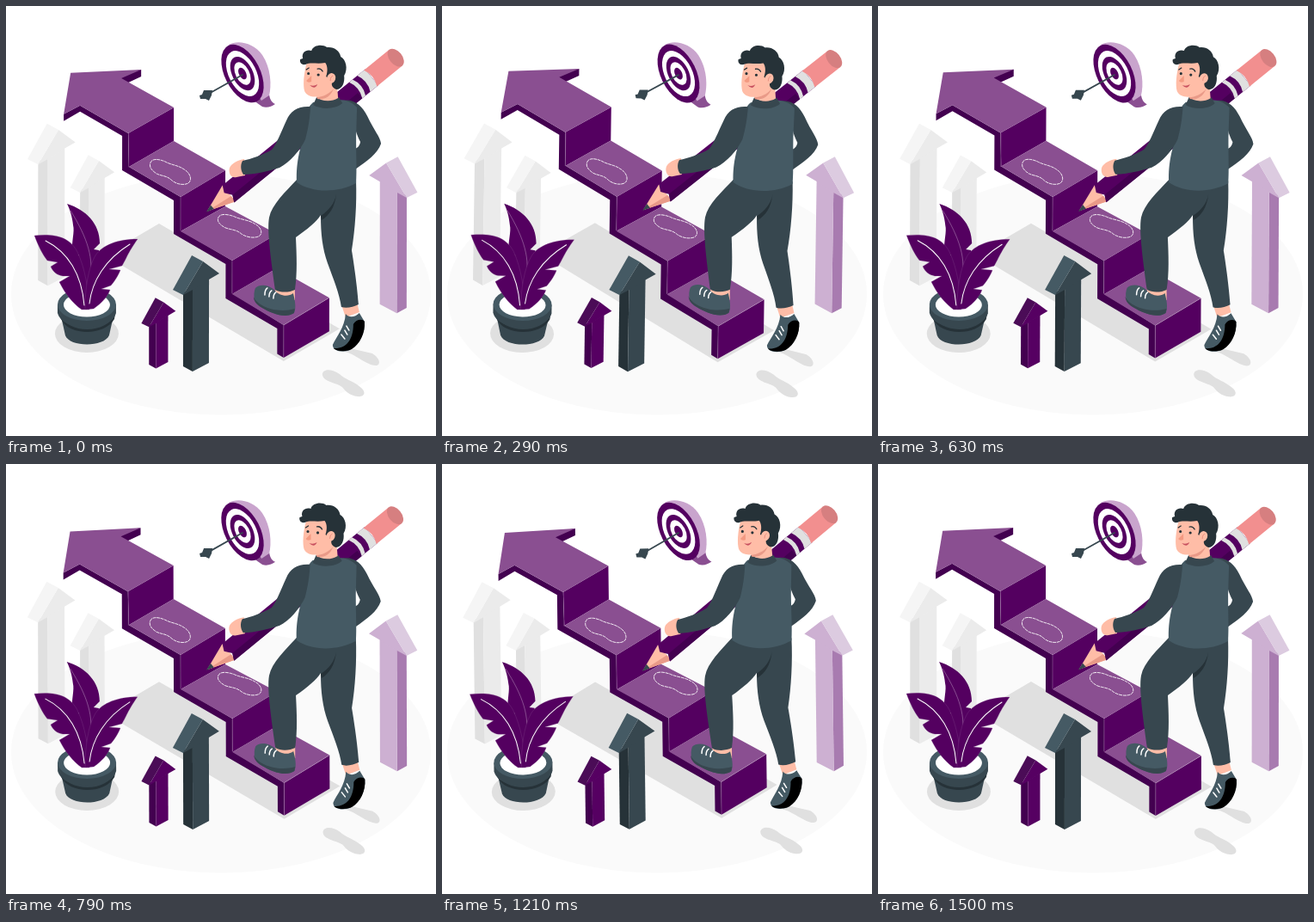
These frames come from a looping animation (500 px wide and 500 px high, 1540 ms). An HTML page:

```html
<!DOCTYPE html>
<html lang="en">
<head>
<meta charset="utf-8">
<title>Drawing the steps up</title>
<style>
  html, body { margin: 0; width: 100%; height: 100%; overflow: hidden; background: #fff; }
  svg { display: block; width: 100vw; height: 100vh; }
  .sway { transform-box: fill-box; transform-origin: center; transform: rotate(var(--angle, 0deg)); }
  .line { fill: none; stroke: #fff; stroke-linecap: round; stroke-linejoin: round; }
  .purple { fill: #540060; } .deep { fill: #430050; } .mauve { fill: #8a4f91; }
  .slate { fill: #37474f; } .steel { fill: #455a64; } .ink { fill: #263238; }
  .skin { fill: #ffbda7; } .shade { fill: #e0e0e0; }
</style>
</head>
<body>
<svg id="stage" viewBox="0 0 500 500">
  <ellipse cx="250" cy="335" rx="244" ry="140.5" fill="#fafafa"/>

  <g id="pale" class="sway"></g>

  <g id="stairs" class="sway">
    <path class="shade" d="M178 253 388 375 323 413 115 290Z"/>
    <path class="deep" d="M157 74V82L140 90 120 80ZM67 126 86 116 142 148 143 187 203 222V261L263 296V334L323 371V409L315.500 404.500V375L255.500 340V300L195 265V226L135 191V151L86 123 67 134Z"/>
    <path class="purple" d="M142 148 195 118V157L143 187ZM203 222 255 191V233L203 262ZM263 296 315 265V305L263 335ZM323 371 376 339V378L323 409Z"/>
    <path class="mauve" d="M75 78 157 74 134 84 195 118 142 148 86 116 67 126ZM143 187 195 157 255 191 203 222ZM203 262 255 233 315 265 263 296ZM263 335 315 305 376 339 323 371Z"/>
    <path class="line" stroke-width=".5" opacity=".45" d="M142.500 148V187M203 222V261M263 296V334M323 409V371L376 339"/>
    <g class="line" stroke-width=".9" stroke-dasharray="3 1.500">
      <path id="sole" d="M168 182C170 177 178 178 185 181 192 185 200 185 207 190 214 194 217 202 212 206 206 209 198 207 193 203 187 197 181 198 175 195 169 191 166 187 168 182Z"/>
      <use href="#sole" transform="translate(67.300 78.200) scale(1.070 .920)"/>
    </g>
  </g>

  <g id="plant" class="sway">
    <ellipse class="shade" cx="94" cy="381" rx="37" ry="22"/>
    <path class="slate" d="M63 356 69 383C74 397 114 397 120 383L126 356Z"/>
    <path class="ink" d="M62 358C72 382 117 382 127 358L126 364C115 384 73 384 64 364Z"/>
    <path class="slate" d="M60 347V357C66 380 122 380 128 357V347Z"/>
    <ellipse class="steel" cx="94" cy="347" rx="34" ry="19"/>
    <ellipse cx="94" cy="347.500" rx="27" ry="14" fill="#fff"/>
    <path class="purple" d="M71 230C93 237 109 253 109 276L102 283 108 284C108 300 106 325 102 350H90C84 330 80 310 78 295L85 290 77 285C76 275 80 262 78 255 77 245 74 236 71 230Z"/>
    <path class="line" stroke-width=".5" opacity=".6" d="M75 238C95 270 103 295 97 320"/>
    <path class="purple" stroke="#8a4f91" stroke-width=".3" d="M33 267C38 280 42 288 48 296L60 298 52 303C55 310 60 313 66 314L74 314 62 321C69 335 78 346 88 353H97C96 330 92 305 83 286 73 267 55 265 33 267Z"/>
    <path class="purple" stroke="#8a4f91" stroke-width=".3" d="M153 271C130 271 112 278 104 290 95 305 92 330 92 353L102 352C112 345 118 338 121 330L111 329 122 325C128 318 131 312 133 307L120 306 135 302C140 294 141 288 153 271Z"/>
    <path class="line" stroke-width="1" d="M46 273C72 286 88 312 91 348M144 277C115 295 100 320 97 346"/>
  </g>

  <g id="dark" class="sway"></g>
  <g id="lilac" class="sway"></g>

  <g id="target" class="sway">
    <path class="mauve" d="M288 110 298 117C303 119 309 117 313 114 309 112 307 109 306 103Z"/>
    <path fill="#c9a4cd" d="M259 45C270 39 288 43 298 57 308 72 309 92 306 104L297 110Z"/>
    <g id="rings" transform="translate(275 78.500) rotate(-27)"></g>
    <path class="line" style="stroke:#37474f" stroke-width="1.800" d="M234 103 275 80"/>
    <path class="slate" d="M240 98 230 98 228 103 225 104 226 108 232 108 236 110 239 104Z"/>
  </g>

  <g id="man" class="sway">
    <path class="shade" d="M396 397 426 404C436 410 436 418 430 418 420 418 405 404 394 402ZM368 428C369 421 380 422 388 428 394 434 404 436 412 443 420 449 417 455 409 454 400 453 395 448 391 443 385 438 368 437 368 428Z"/>
    <g transform="translate(453 60) rotate(140.800)">
      <path class="skin" d="M250-12 283 0 250 12Z"/>
      <path fill="#e99a88" d="M250-12 283 0 250-4Z"/>
      <path class="slate" d="M275-3 284 0 275 3Z"/>
      <path class="purple" d="M36-12H252L248-4 254 4 250 12H36Z"/>
      <path class="deep" d="M60-12H252L248-4H60Z"/>
      <path id="band" class="shade" d="M36-12H48Q42 0 48 12H36Z"/>
      <path class="shade" d="M55-12H60Q54 0 60 12H55Q49 0 55-12Z"/>
      <path fill="#f28f8f" d="M0-12H38Q32 0 38 12H0Z"/>
      <ellipse rx="7.500" ry="12" fill="#d67f80"/>
    </g>

    <path class="skin" d="M313 328H336V342H314ZM390 347 408 344 411 356 395 362Z"/>
    <path class="steel" d="M312 330C317 337 328 339 334 334 336 342 338 351 335 357 325 364 308 357 298 351 288 346 287 336 290 328 295 323 305 324 312 330Z"/>
    <path class="slate" d="M288 338C292 349 315 358 336 352L335 357C325 364 308 357 298 351 291 347 288 343 288 338Z"/>
    <path class="steel" d="M395 358C399 363 406 362 411 357L417 367C418 380 411 394 400 400 392 403 380 402 380 394 384 385 394 374 395 358Z"/>
    <path fill="#000" d="M404 370C407 364 415 363 417 367 418 380 412 393 402 399 396 402 386 402 381 398 395 399 404 389 404 370Z"/>
    <path class="line" stroke-width="1.500" d="M301 336Q301 330 304 328M306 338Q306 333 309 331M311 340Q311 335 314 333M396 372 399 377M394 377 397 382M390 382 394 387"/>

    <path class="slate" d="M338 202C325 216 309 231 306 246 303 262 309 300 313 330 320 334 330 333 336 330 339 310 338 290 337 269 350 260 362 250 366 243 366 265 368 282 374 299 381 318 388 335 390 350 396 352 404 350 410 347 408 320 403 290 402 284 406 260 408 230 407 203Z"/>
    <path class="ink" d="M366 244C375 238 382 230 384 219 382 235 376 243 367 249Z"/>

    <path class="slate" d="M390 110C405 107 414 116 420 128 428 145 435 152 436 160 432 172 420 180 406 190V166C410 164 411 162 412 158 408 150 406 145 405 135Z"/>
    <path class="skin" d="M277 178C270 179 262 183 260 188 258 194 262 201 268 199L278 197Z"/>
    <path class="steel" d="M357 112C351 117 350 122 351 135 342 165 337 180 338 205 355 217 385 218 407 206 408 190 407 175 407 152L408 118C403 112 395 109 387 109Z"/>
    <path class="slate" d="M354 117C340 116 331 121 326 133 319 148 315 160 309 167 299 173 285 178 275 180 272 185 273 192 276 196 290 196 305 192 318 188 330 182 342 168 348 155 352 140 353 130 354 117Z"/>
    <path class="slate" d="M361 106C368 111 380 111 387 106L391 113C382 121 365 120 357 115Z"/>

    <path class="skin" d="M362 95H385L386 107C378 112 367 111 361 106Z"/>
    <path fill="#e99a88" d="M361 106C368 106 376 102 381 96 377 106 370 109 362 108Z"/>
    <path class="skin" d="M349 68C346 80 345 92 347 99 350 106 360 107 368 104 378 100 383 95 384 88L378 62C365 58 355 60 349 68Z"/>
    <path class="ink" d="M348 68C343 69 341 65 342 62L345 61C343 54 349 50 355 52 357 45 368 44 373 48 381 47 388 52 389 59 395 62 398 73 393 81 394 89 391 97 384 97 379 95 378 92 379 88L372 82C374 76 374 70 371 66 362 68 354 65 348 68Z"/>
    <ellipse class="skin" cx="378" cy="84" rx="5" ry="6" transform="rotate(20 378 84)"/>
    <path d="M377 87Q377 82 380 81" fill="none" stroke="#e58c7d" stroke-width=".9"/>
    <path fill="#f39a82" d="M355 81 349 87Q351 90 355 88Z"/>
    <circle class="ink" cx="351.500" cy="78.500" r="1.600"/>
    <circle class="ink" cx="363" cy="80" r="1.600"/>
    <path class="line" style="stroke:#263238" stroke-width="1.300" d="M349 74 352 72M362 73Q366 72 368 76"/>
    <path fill="#c85160" d="M353 92Q358 94 362 91 359 98 353 92Z"/>
  </g>
</svg>

<script>
  const stage = document.getElementById('stage');
  const add = (id, markup) => document.getElementById(id).innerHTML += markup;

  // Extruded arrow; x, y is the front tip and h the distance down to its foot.
  function arrow(id, x, y, scale, h, [roof, front, side], flip = 1) {
    const face = (fill, d) => `<path fill="${fill}" d="${d}"/>`;
    add(id, `<g transform="translate(${x} ${y}) scale(${scale * flip} ${scale})">` +
      face(side, `M-23 36-12 30V${h}L-23 ${h - 6}Z`) +
      face(front, `M-12 32 7 20V${h - 10}L-12 ${h}Z`) +
      face(front, 'M0 0-23 39-12 33 7 21 19 14Z') +
      face(roof, 'M0 0-13-7-35 33-23 39Z') + '</g>');
  }

  const pale = ['#f5f5f5', '#ebebeb', '#e0e0e0'];
  arrow('pale', 61, 144, 1.03, 176, pale);
  arrow('pale', 108, 180, .95, 150, pale);
  arrow('dark', 183.3, 344.5, .74, 104, ['#4b0c57', '#560062', '#430050']);
  arrow('dark', 229, 297, 1, 128, ['#455a64', '#37474f', '#263238']);
  arrow('lilac', 442, 182.5, 1.04, 168, ['#dccbe0', '#cdb0d2', '#a87bb0'], -1);

  [1, .78, .58, .39, .2].forEach((k, i) =>
    add('rings', `<ellipse rx="${20.5 * k}" ry="${36.5 * k}" fill="${i % 2 ? '#fff' : '#540060'}"/>`));

  // Linear swing 0 > 1 > -1 > 0 degrees, with a short rest before each repeat.
  const LOOP = 1540, SWING = 1500, LEAD = 20;
  function draw(now) {
    const time = Math.min(now % LOOP, SWING);
    const phase = ((time + LEAD) / SWING + .25) % 1;
    const angle = 1 - 4 * Math.abs(phase - .5);
    stage.style.setProperty('--angle', angle + 'deg');
    requestAnimationFrame(draw);
  }
  draw(performance.now());
</script>
</body>
</html>
```
